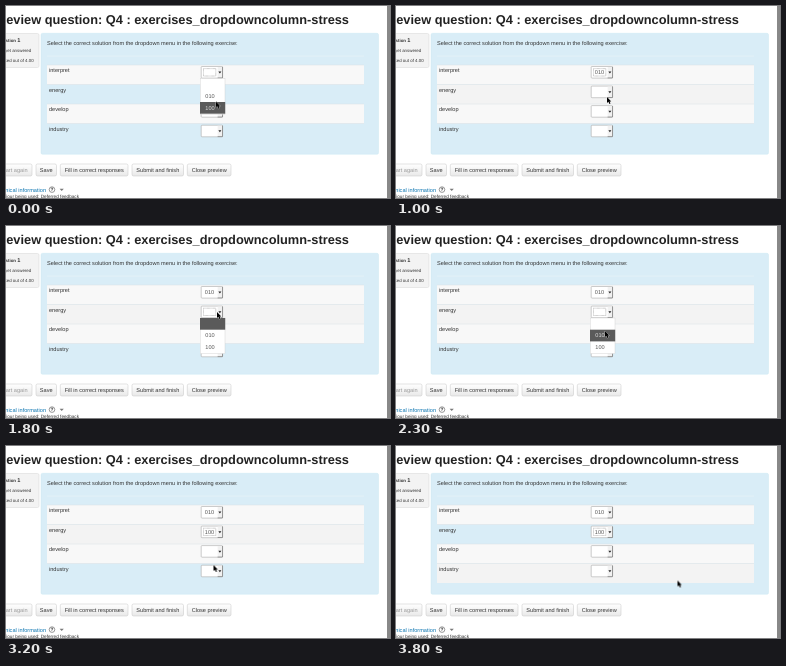
These frames come from a looping animation (384x192 px, 4 s). An HTML page:

```html
<!DOCTYPE html>
<html lang="en">
<head>
<meta charset="utf-8">
<title>Dropdown exercise preview</title>
<style>
  html, body { margin: 0; width: 100%; height: 100%; overflow: hidden; background: #fff; }
  svg { display: block; width: 100%; height: 100%; font: 5.6px "Liberation Sans", Arial, sans-serif; }
  text { fill: #333; text-rendering: geometricPrecision; white-space: pre; }
  .title { font-size: 12.8px; font-weight: bold; fill: #222; }
  .info { font-size: 4.4px; }
  .link { fill: #0a74b0; }
  .mid { text-anchor: middle; }
  .end { text-anchor: end; }
  .value { fill: #555; }
  .disabled { fill: #999; }
  .btn rect { fill: url(#face); stroke: #c4c4c4; stroke-width: .5; }
  .row { fill: #f8f8f8; }
  .hover { fill: #f3f3f3; }
  .rules { stroke: #dbe1e4; stroke-width: .5; }
  .focus { fill: none; stroke: #777; stroke-width: .5; stroke-dasharray: .7 .5; }
  .pick use { fill: #5a5a5a; }
  .pick text { fill: #ddd; }

  .timed, .cursor { animation: 4s step-end infinite; }
  .cursor { animation-name: move; }

  /* first menu */
  @keyframes menuA { 0% { opacity: 1 } 25%, 100% { opacity: 0 } }
  @keyframes a100 { 0% { opacity: 1 } 17.5%, 100% { opacity: 0 } }
  @keyframes a010 { 0% { opacity: 0 } 17.5% { opacity: 1 } 25%, 100% { opacity: 0 } }
  @keyframes valueA { 0% { opacity: 0 } 25%, 100% { opacity: 1 } }
  @keyframes focusA { 0% { opacity: 1 } 45%, 100% { opacity: 0 } }

  /* second menu */
  @keyframes menuB { 0% { opacity: 0 } 45% { opacity: 1 } 80%, 100% { opacity: 0 } }
  @keyframes bNone { 0% { opacity: 0 } 45% { opacity: 1 } 57.5%, 100% { opacity: 0 } }
  @keyframes b010 { 0% { opacity: 0 } 57.5% { opacity: 1 } 67.5%, 100% { opacity: 0 } }
  @keyframes b100 { 0% { opacity: 0 } 67.5% { opacity: 1 } 80%, 100% { opacity: 0 } }
  @keyframes valueB { 0% { opacity: 0 } 80%, 100% { opacity: 1 } }
  @keyframes focusB { 0% { opacity: 0 } 45%, 100% { opacity: 1 } }

  @keyframes hoverEnergy { 0% { opacity: 0 } 25% { opacity: 1 } 82.5%, 100% { opacity: 0 } }
  @keyframes hoverIndustry { 0% { opacity: 0 } 82.5%, 100% { opacity: 1 } }

  @keyframes move {
    0% { transform: translate(210px, 95.5px) }
    17.5% { transform: translate(210px, 92px) }
    20% { transform: translate(210.5px, 91.5px) }
    25% { transform: translate(211px, 91px) }
    27.5% { transform: translate(211px, 90px) }
    30% { transform: translate(211px, 89px) }
    32.5% { transform: translate(211px, 88px) }
    35% { transform: translate(211px, 87px) }
    37.5% { transform: translate(211px, 86px) }
    52.5% { transform: translate(211px, 89px) }
    55% { transform: translate(210px, 97px) }
    57.5% { transform: translate(209px, 105px) }
    60% { transform: translate(208.6px, 109px) }
    62.5% { transform: translate(208px, 112px) }
    65% { transform: translate(207.5px, 114px) }
    67.5% { transform: translate(207px, 115.5px) }
    80%, 82.5% { transform: translate(207.5px, 119px) }
    90% { transform: translate(225px, 123px) }
    92.5% { transform: translate(258px, 130px) }
    95%, 100% { transform: translate(281.5px, 134.5px) }
  }
</style>
</head>
<body>
<svg viewBox="0 0 384 192" preserveAspectRatio="none">
  <defs>
    <linearGradient id="face" x2="0" y2="1">
      <stop stop-color="#fff"/><stop offset="1" stop-color="#e9e9e9"/>
    </linearGradient>
    <g id="select">
      <rect x="195.2" y="-5.8" width="21.4" height="11.6" rx=".8" fill="#fff" stroke="#aaa" stroke-width=".6"/>
      <path d="M211.6-5.3H216.4V5.4H211.6Z" fill="#f1f1f1"/>
      <path d="M216.5-5.4V5.6H211.6" fill="none" stroke="#777" stroke-width=".7"/>
      <path d="M212.4-.7h3l-1.5 2z" fill="#222"/>
    </g>
    <g id="menu">
      <rect x="194.2" y="0" width="24.8" height="35.6" fill="#fff" stroke="#ccc" stroke-width=".4"/>
      <text class="mid value" x="204" y="19.2">010</text>
      <text class="mid value" x="204" y="30.9">100</text>
    </g>
    <rect id="bar" x="194" width="25.2" height="11.7"/>
  </defs>

  <text class="title end" x="343" y="18">Preview question: Q4 : exercises_dropdowncolumn-stress</text>

  <rect x="-12" y="27.5" width="45" height="34" rx="1.6" fill="#f3f3f3" stroke="#dcdcdc" stroke-width=".6"/>
  <text class="info" x="-9" y="35.6" font-weight="bold">Question <tspan font-size="5.6">1</tspan></text>
  <text class="info" x="-9" y="45.8">Not yet answered</text>
  <text class="info" x="-9" y="56.3">Marked out of 4.00</text>

  <rect x="35" y="27.3" width="337.5" height="121" rx="1.6" fill="#d9edf7" stroke="#c6e6f0" stroke-width=".4"/>
  <text x="41" y="39.2">Select the correct solution from the dropdown menu in the following exercise:</text>
  <path d="M41 50.2H358" stroke="#e6f3f9" stroke-width=".8"/>

  <rect class="row" x="41" y="59" width="317" height="19.5"/>
  <rect class="row" x="41" y="98" width="317" height="19.5"/>
  <rect class="hover timed" style="animation-name:hoverEnergy" x="41" y="78.5" width="317" height="19.5"/>
  <rect class="hover timed" style="animation-name:hoverIndustry" x="41" y="117.5" width="317" height="19.5"/>
  <path class="rules" d="M41 59h317M41 78.5h317M41 98h317M41 117.5h317"/>
  <text x="43" y="66.2">interpret</text>
  <text x="43" y="85.8">energy</text>
  <text x="43" y="105.3">develop</text>
  <text x="43" y="124.9">industry</text>

  <use href="#select" y="66.3"/>
  <use href="#select" y="85.9"/>
  <use href="#select" y="105.4"/>
  <use href="#select" y="125"/>
  <text class="mid value timed" style="animation-name:valueA" x="203.5" y="68.4">010</text>
  <text class="mid value timed" style="animation-name:valueB" x="203.5" y="88">100</text>
  <rect class="focus timed" style="animation-name:focusA" x="197.4" y="62.6" width="12.4" height="7.4"/>
  <rect class="focus timed" style="animation-name:focusB" x="197.4" y="82.2" width="12.4" height="7.4"/>

  <g class="timed" style="animation-name:menuA">
    <use href="#menu" y="72.6"/>
    <g class="pick timed" style="animation-name:a010"><use href="#bar" y="84.3"/><text class="mid" x="204" y="91.8">010</text></g>
    <g class="pick timed" style="animation-name:a100"><use href="#bar" y="96"/><text class="mid" x="204" y="103.5">100</text></g>
  </g>
  <g class="timed" style="animation-name:menuB">
    <use href="#menu" y="92"/>
    <g class="pick timed" style="animation-name:bNone"><use href="#bar" y="92"/></g>
    <g class="pick timed" style="animation-name:b010"><use href="#bar" y="103.7"/><text class="mid" x="204" y="111.2">010</text></g>
    <g class="pick timed" style="animation-name:b100"><use href="#bar" y="115.4"/><text class="mid" x="204" y="122.9">100</text></g>
  </g>

  <g class="btn">
    <rect x="-14" y="158" width="40" height="12" rx="1.6"/><text class="end disabled" x="21.5" y="166">Start again</text>
    <rect x="30" y="158" width="20.5" height="12" rx="1.6"/><text class="mid" x="40.2" y="166">Save</text>
    <rect x="54.3" y="158" width="67.7" height="12" rx="1.6"/><text class="mid" x="88.2" y="166">Fill in correct responses</text>
    <rect x="126" y="158" width="51.5" height="12" rx="1.6"/><text class="mid" x="151.8" y="166">Submit and finish</text>
    <rect x="181.3" y="158" width="43.7" height="12" rx="1.6"/><text class="mid" x="203.2" y="166">Close preview</text>
  </g>

  <text class="end link" x="40" y="185.6">Technical information</text>
  <circle cx="46" cy="183.6" r="2.8" fill="#fff" stroke="#555" stroke-width=".6"/>
  <text class="mid" x="46" y="185.3" font-size="4.8" font-weight="bold">?</text>
  <path d="M53.6 182.8h4.2l-2.1 2.3z" fill="#777"/>
  <text class="end" x="73" y="192.4" font-size="4.67">Behaviour being used: Deferred feedback</text>

  <rect x="381" width="3" height="192" fill="#888"/>

  <path class="cursor" d="M0 0V6L1.4 4.8 2.4 7 3.5 6.5 2.6 4.4H4.3Z" fill="#000" stroke="#fff" stroke-width=".5" paint-order="stroke"/>
</svg>
</body>
</html>
```
